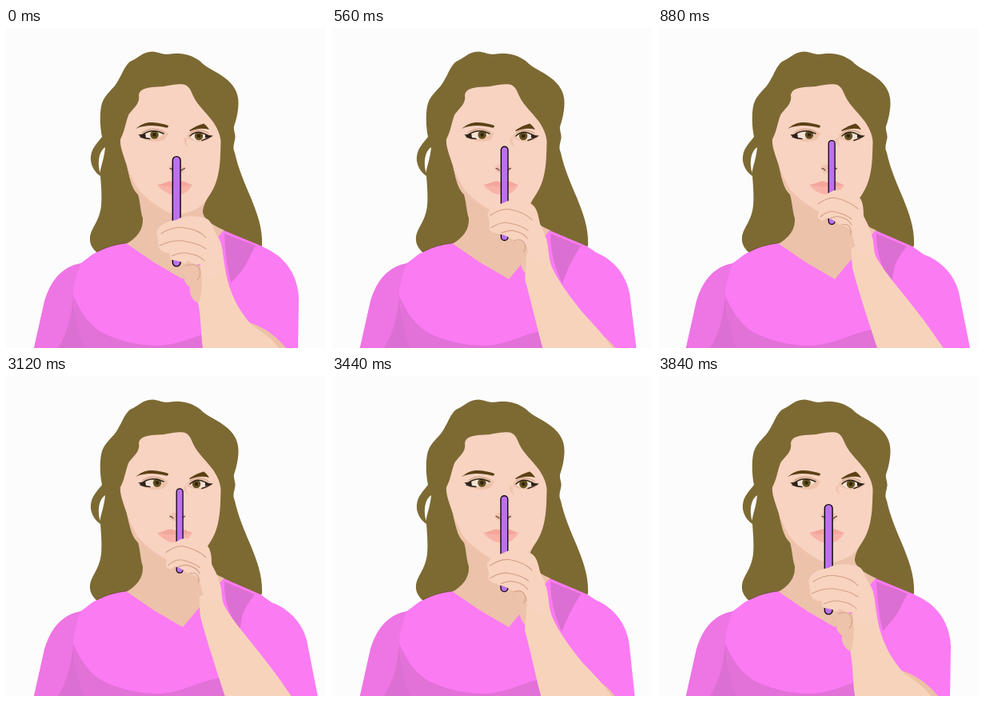
An HTML page that plays this animation: 400x400 px, repeating every 5840 ms.

```html
<!DOCTYPE html>
<html lang="en">
<head>
<meta charset="utf-8">
<title>Woman following a pen</title>
<style>
  html, body { margin: 0; width: 100%; height: 100%; overflow: hidden; background: #fcfcfc; }
  svg { display: block; width: 100%; height: 100%; }
</style>
</head>
<body>
<svg viewBox="0 0 400 400">
  <!-- hair -->
  <path fill="#7d6a33" d="M183 29.500C192 30 195 34 205 32.500C220 30 232 34 242 41C252 51 263 54 273 62C284 70 291 80 290.500 95C290 108 287 117 285 123C284 129 288 133 286 140C285 146 283 149 286 156C290 175 298 193 306 212C314 232 321 250 320 272L300 300H130L114 281C109 277 104 270 105 262C106 250 117 242 119 222C120 210 119 198 118 185C110 180 105 170 106 161C107 150 114 144 120 136C117 122 117 103 120 94C124 82 135 76 140 66C146 56 148 48 155 42C165 38 170 30 183 29.500Z"/>
  <path fill="#fcfcfc" d="M124 149C116 154 114 168 117.500 181C119 171 123 162 124 149Z"/>
  <!-- neck -->
  <path fill="#ecc2ab" d="M158 190L165 208C168 219 168 229 171 238C172 252 163 263 150 270L185 300L221 318L273 253C260 247 247 240 246 230C246 222 252 212 259 200Z"/>
  <!-- face -->
  <path fill="#f8d3c1" d="M143 139C148 130 149 120 153 109C158 101 168 95 166 84C167 76 176 74 190 73.500C203 73 210 69 222 70.500C229 72 231 78 234 85C240 98 253 108 260 119C265 127 268 134 268.500 142C268 158 268 171 265 184C261 203 250 216 243 223C232 231 217 235 204 231C192 227 176 217 164 207C157 199 155 188 151 172C147 159 142 148 143 139Z"/>
  <path fill="#efc2ab" d="M151 172C155 189 157 200 164 207C178 219 192 227 204 231C190 224 169 209 163 198C158 189 154 180 151 172Z"/>
  <!-- eyes -->
  <path fill="#efc3ab" d="M166 134C174 124 190 123 203 132L198 140C185 144 175 142 166 134ZM226 134C234 125 250 125 258 136C250 144 235 143 227 138Z"/>
  <path fill="#f3e2d6" d="M172 134Q183 125 197 132Q188 141 176 138ZM230 136Q240 127 252 133Q247 142 236 140Z"/>
  <g id="leftIris"><circle cx="185.500" cy="133.500" r="5.200" fill="#65501f"/><circle cx="185.500" cy="133.500" r="2.300" fill="#30240f"/></g>
  <g id="rightIris"><circle cx="241" cy="135" r="5.200" fill="#65501f"/><circle cx="241" cy="135" r="2.300" fill="#30240f"/></g>
  <path fill="none" stroke="#2d241c" stroke-width="1.500" stroke-linecap="round" d="M171 133Q183 125 197 132M168 136Q173 138 180 138.500M230 135Q239 126 251 134M255 136Q251 139 245 140.500"/>
  <path fill="#2d241c" d="M165 133Q169 134 174 131L175 137.500Q169 137 165 133ZM259 134.500Q254 135 249 132L249 137.500Q255 138 259 134.500Z"/>
  <path fill="none" stroke="#b98f72" stroke-width=".7" d="M171 130Q183 122 198 130M230 131Q241 124 253 131"/>
  <path fill="#5b4115" d="M162 126C169 120 176 117.500 183 118C191 118.500 197 120 203 122C203 124 202 125 200 124.500C189 122 175 120 162 126ZM229 128C235 124 241 121 247 119.500C250 121 252 124 254 127C246 124.500 237 126 230 129Z"/>
  <!-- nose and mouth -->
  <path fill="#f1c5b1" d="M223 137C220 142 224 147 229 149C226 145 225 142 227 137ZM204 173C207 170 220 170 224 174L222 181C217 183 209 182 205 179Z"/>
  <path fill="none" stroke="#775043" stroke-width="1.300" stroke-linecap="round" d="M205 175.500Q208 176 209 178M223.500 175.500Q221 176 219.500 178"/>
  <path fill="#f3a69c" d="M189 196C196 195 202 191 207 191.500Q213 195 219 191.500C224 191 228 195 233 196Q220 200 212 199Q201 200 189 196Z"/>
  <path fill="#f8b3a9" d="M189 196Q201 199 212 198Q222 199 233 196C228 205 222 209 212 208C203 209 195 203 189 196Z"/>
  <!-- shirt -->
  <path id="shirt" fill="#fb7bf3"/>
  <path fill="#ee75e4" d="M94 294C68 298 55 320 48 342L35 400H66C79 382 84 360 84 335C84 320 89 305 94 294Z"/>
  <path fill="#e271d8" d="M84 334C93 356 107 376 127 384C148 393 170 397 190 397C222 396 235 383 272 376L278 400H92Z"/>
  <path fill="#dc6fd2" d="M84 334C82 362 76 383 65 400H97C91 381 86 363 84 334Z"/>
  <path id="fold" fill="#dc6fd2"/>
  <path d="M114 279.500Q131 271 150 269" fill="none" stroke="#493c20" stroke-width="1" stroke-dasharray="1 1"/>
  <!-- pen -->
  <path id="rim" stroke="#0b070d" stroke-linecap="round"/>
  <path id="pen" stroke="#bd70ee" stroke-linecap="round"/>
  <!-- hand -->
  <path id="sleeve" fill="#ecc2a6"/>
  <path id="arm" fill="#f8d3bc"/>
  <path id="hand" fill="#f8d3bf"/>
  <path id="palm" fill="#edc3ab"/>
  <path id="lines" fill="none" stroke="#d3a087" stroke-width="1.100" stroke-linecap="round" stroke-linejoin="round"/>
</svg>
<script>
const LOOP = 5840, STEP = 80, STEPS = 10, RISE = 160, FALL = 3120;

// Each shape: path with the hand low, path with the hand raised.
const shapes = {
  shirt: [
    'M150 269L185 293L221 314L272 253L318 272L328 277C350 288 365 310 366 338L365 400L35 400L48 342C55 318 67 300 92 295C101 289 108 282 114 280Q131 271 150 269Z',
    'M150 269L185 293L221 314L272 253L318 273L332 283C352 290 370 307 376 330L390 400L35 400L48 342C55 318 67 300 92 295C101 289 108 282 114 280Q131 271 150 269Z'],
  fold: [
    'M273 257L312 272C305 284 301 296 294 304L281 319Q274 290 273 257Z',
    'M273 257L311 273C303 283 297 292 295 301L292 320Q272 288 273 257Z'],
  sleeve: [
    'M300 367C319 372 334 381 350 400L325 400Z',
    'M345 386C349 390 353 394 357 400L350 400Z'],
  arm: [
    'M243 292L268 267C272 280 272 296 277 316C283 338 293 355 306 370C319 380 333 388 341 400L246 400C243 380 244 355 239 340Z',
    'M241 276L267 259C271 268 268 277 273 287C285 308 303 327 318 347C333 366 345 382 356 400L274 400C265 372 251 331 243 300Z'],
  hand: [
    'M189 253C194 244 204 241 213 240C221 234 238 234 250 238C258 241 258 252 265 261C271 270 271 285 272 297C263 314 248 316 244 296C239 293 236 299 229 296C222 295 219 291 208 290C204 288 205 284 204 281C197 282 190 277 190 270C191 264 187 258 189 253Z',
    'M199 217C203 210 210 208 216 205C221 201 235 201 246 207C255 212 257 220 257 235C262 245 268 254 269 273C263 288 249 288 243 260C239 248 236 249 229 246C223 245 220 239 213 238C209 237 208 240 206 241C201 240 198 236 201 231C202 226 197 222 199 217Z'],
  palm: [
    'M226 291C220 305 221 319 230 324C228 334 235 342 241 344C245 334 246 315 243 298Z',
    'M238 247C241 252 240 256 239 261C237 268 239 277 242 284C241 274 242 264 243 255Z'],
  lines: [
    'M194 257Q210 247 224 250Q241 252 250 262M192 272Q211 263 225 267Q240 269 250 276M207 285Q221 279 229 282Q242 284 248 291M225 297Q239 293 242 302Q244 310 239 315',
    'M200 220Q211 212 220 212Q239 216 250 226M203 236Q213 227 222 230Q235 233 242 239M215 238Q224 234 230 237Q238 239 242 246M230 246Q238 244 240 250Q242 254 240 258'],
  rim: ['M213.200 165.500L213.200 293', 'M217.200 144.500L217.200 241.500'],
  pen: ['M213.200 165.500L213.200 293', 'M217.200 144.500L217.200 241.500']
};

const get = id => document.getElementById(id);
const lerp = (a, b, p) => a + (b - a) * p;

function mix([low, high], p) {
  const ends = high.match(/[\d.]+/g);
  let i = 0;
  return low.replace(/[\d.]+/g, n => lerp(+n, +ends[i++], p).toFixed(2));
}

// Eased progress, held for one step at a time.
function ease(ms) {
  const k = Math.floor(ms / STEP) + 1;
  if (k < 1) return 0;
  if (k >= STEPS) return 1;
  return (1 - Math.cos(Math.PI * (k - 0.25) / STEPS)) / 2;
}

function draw(t) {
  const p = t < FALL ? ease(t - RISE) : 1 - ease(t - FALL);
  for (const id in shapes) get(id).setAttribute('d', mix(shapes[id], p));
  get('rim').setAttribute('stroke-width', lerp(11.2, 9.2, p));
  get('pen').setAttribute('stroke-width', lerp(8.3, 6.6, p));
  // The eyes converge as the pen comes closer.
  get('leftIris').setAttribute('transform', `translate(${3.5 * p} 0)`);
  get('rightIris').setAttribute('transform', `translate(${-3 * p} 0)`);
}

const start = performance.now();
function tick() {
  draw((performance.now() - start) % LOOP);
  requestAnimationFrame(tick);
}
tick();
</script>
</body>
</html>
```
